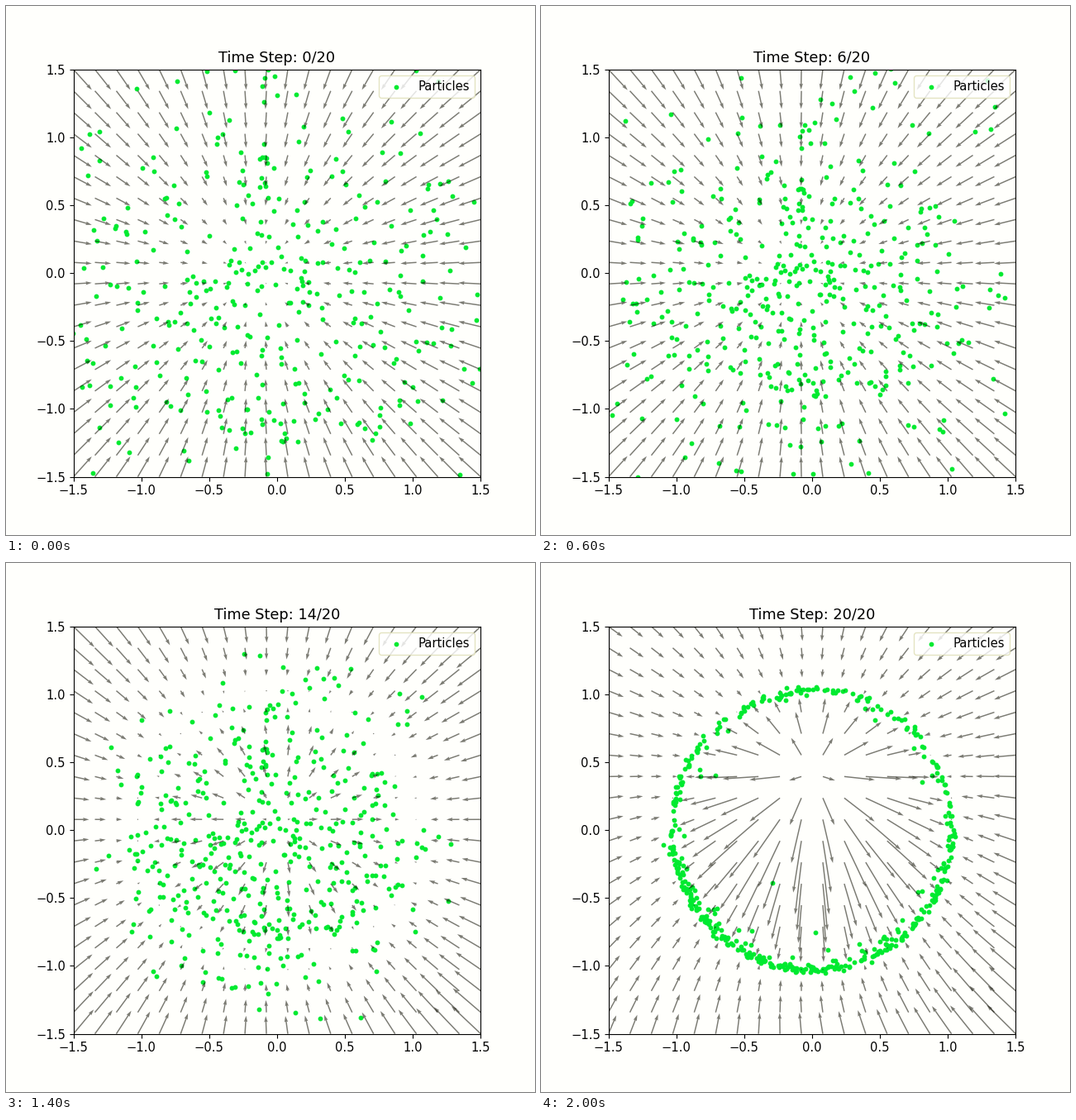
Recreate the animation shown at these times as a matplotlib script. Size 640x640 px, loop 2140 ms.

```python
import numpy as np
import matplotlib.pyplot as plt
from matplotlib.animation import FuncAnimation

STEPS = 20
DT = 1 / STEPS
RADIUS = 1.05
LIM = 1.5
COUNT = 460
TICK_MS = 10
LOOP_MS = 2140
PAPER = "#fffffc"


def field(p, t, blur=1.0):
    """Velocity carrying a Gaussian cloud onto a ring; blur slows the end."""
    centre = np.array([0, 0.42 * t**5])
    q = p - centre
    d = np.linalg.norm(q, axis=1, keepdims=True) + 1e-9
    u = q / d

    # Distance from the moving centre to the ring along each ray.
    along = u @ centre[:, None]
    reach = np.sqrt(along**2 + RADIUS**2 - centre @ centre) - along
    pull = 0.5 * t * RADIUS**2 / ((1 - t)**2 + 0.2 * t**2)
    goal = centre + np.tanh(pull * d / reach) * reach * u

    # The outside trails behind, most of all at the upper left.
    x, y = p[:, :1], p[:, 1:]
    r = np.hypot(x, y) + 1e-9
    out = np.maximum(r - RADIUS, 0)
    lag = t**4 * out * (0.45 - 0.15 * x / r + 0.15 * y / r)
    v = (goal - p) / (1 - t + blur * (0.15 * t**6 + lag))
    v[:, :1] += 0.3 * t**3 * out * np.minimum(y, 0) - 0.15 * blur * (1 - t)
    return v


def flow(p):
    """Particle positions at every step."""
    path = [p]
    for k in range(STEPS):
        path.append(path[-1] + DT * field(path[-1], (k + 0.5) * DT, blur=0.3))
    return path


def step_at(ms):
    """Even steps hold 130 ms, odd ones 70 ms."""
    return min(2 * (ms // 200) + (ms % 200 >= 130), STEPS)


rng = np.random.default_rng(7)
paths = flow(rng.normal((-0.06, -0.03), 1, (COUNT, 2)))

axis = np.linspace(-LIM, LIM, 20)
gx, gy = np.meshgrid(axis, axis)
nodes = np.column_stack([gx.ravel(), gy.ravel()])
arrows = [field(nodes, k * DT) for k in range(STEPS + 1)]

plt.rcParams["font.size"] = 10.65
fig, ax = plt.subplots(figsize=(6.4, 6.4), dpi=100, facecolor=PAPER)
ax.set_facecolor(PAPER)
ax.set_aspect("equal")
ax.set(xlim=(-LIM, LIM), ylim=(-LIM, LIM))
dots = ax.scatter(*paths[0].T, s=10, color="#00ea30", label="Particles")
quiver = ax.quiver(gx, gy, *arrows[0].T, scale=30, color="#0c0c00", alpha=0.54)
title = ax.set_title("")
ax.legend(loc="upper right", edgecolor="#dedeb4")


def update(i):
    k = step_at(i * TICK_MS)
    dots.set_offsets(paths[k])
    quiver.set_UVC(*arrows[k].T)
    title.set_text(f"Time Step: {k}/{STEPS}")
    return dots, quiver, title


anim = FuncAnimation(fig, update, frames=LOOP_MS // TICK_MS,
                     interval=TICK_MS, repeat=True, repeat_delay=0)
plt.show()
```
